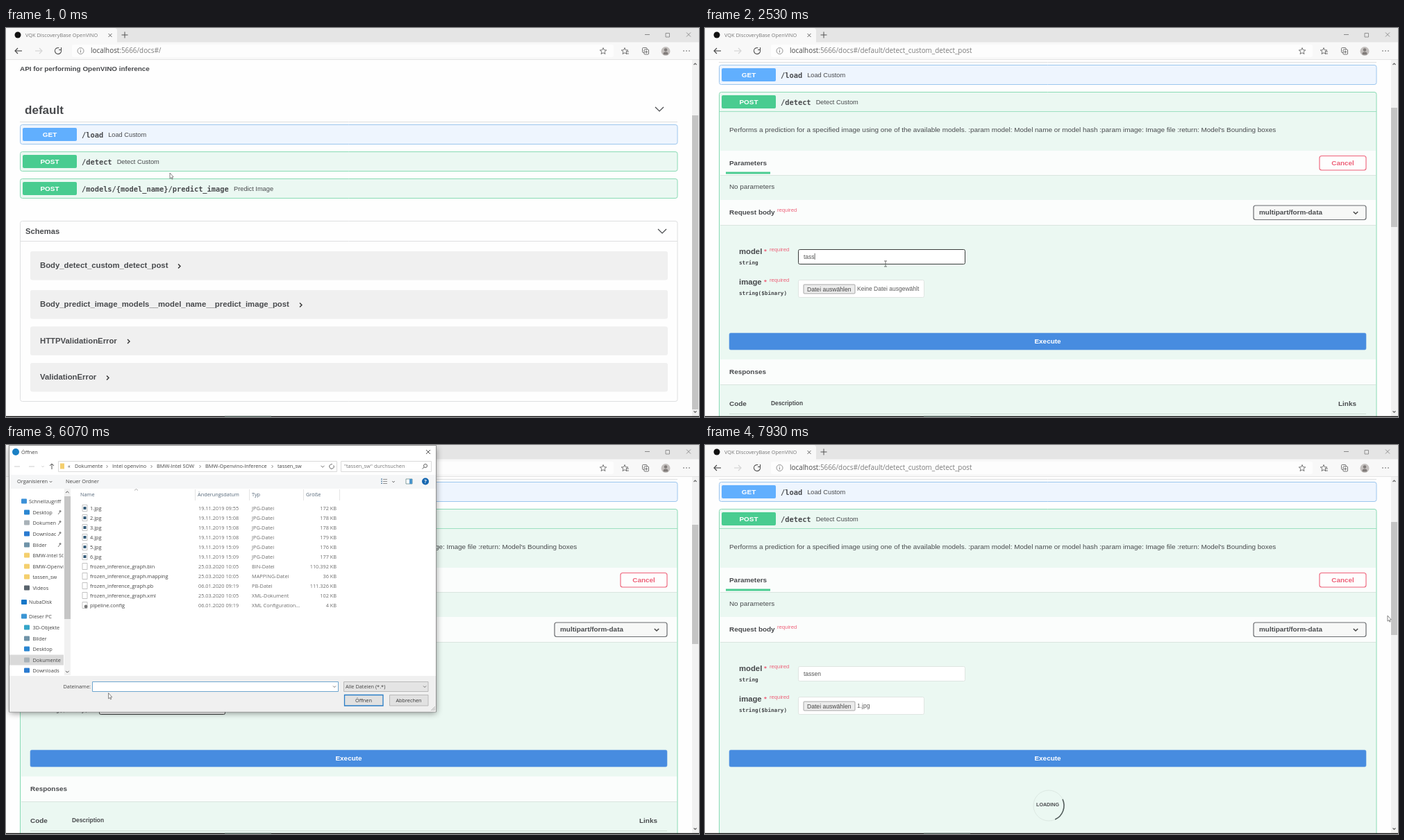
Animation of 998x561 px, one loop 8 s. Source, as an HTML page with a canvas:

```html
<!DOCTYPE html>
<html lang="en">
<head>
<meta charset="utf-8">
<title>API docs</title>
<style>
html, body { margin: 0; width: 998px; height: 561px; overflow: hidden; background: #fff; }
canvas { display: block; }
</style>
</head>
<body>
<canvas id="stage" width="998" height="561"></canvas>
<script>
const c = document.getElementById('stage').getContext('2d');
const ARIAL = '"Liberation Sans", Arial, sans-serif';
const UI = '"Open Sans", "Noto Sans", sans-serif';
const MONO = '"DejaVu Sans Mono", monospace';
const INK = '#484a4d', GREEN = '#49cc90', BLUE = '#61affe', RED = '#ee6078';
const GREEN_EDGE = '#8adbb5', BLUE_EDGE = '#9cc6ee';
const LOOP = 8000;

// Moments of the story, in ms
const T = { expand: 350, scroll: 600, tryIt: 1200, focus: 1800, upload: 4200, idle: 4870,
  open: 5400, list: 5620, pick: 6400, close: 6680, execute: 7250 };
const KEYS = [[2130, 't'], [2270, 'a'], [2400, 's'], [2480, 's'], [2600, 'e'], [2730, 'n']];
const PATH = [[70, 236, 213], [330, 218, 196], [600, 218, 196], [870, 300, 197], [930, 320, 197],
  [1150, 891, 200], [1330, 891, 200], [1730, 260, 340], [3000, 260, 340], [3470, 149, 388],
  [6000, 149, 388], [6380, 133, 101], [6490, 133, 101], [6660, 515, 370], [6870, 515, 370],
  [7150, 495, 455], [7350, 495, 455], [7830, 983, 250]];

const clamp = v => Math.max(0, Math.min(1, v));
const span = (t, from, length) => clamp((t - from) / length);
const smooth = p => p * p * (3 - 2 * p);
const easeOut = p => 1 - (1 - p) ** 3;

// Text is placed by its vertical centre
function text(s, x, y, size, color = INK, font = ARIAL, bold = false, align = 'left') {
  c.font = `${bold ? 'bold ' : ''}${size}px ${font}`;
  c.textAlign = align;
  c.fillStyle = color;
  c.fillText(s, x, y + size * 0.35);
}
const bold = (s, x, y, size = 9.94, color = INK, align = 'left') => text(s, x, y, size, color, ARIAL, true, align);
const ui = (s, x, y, color = '#444', align = 'left') => text(s, x, y, 7.35, color, UI, false, align);

function box(x, y, w, h, fill, stroke, r = 0, lw = 1) {
  c.beginPath();
  c.roundRect(x, y, w, h, r);
  if (fill) { c.fillStyle = fill; c.fill(); }
  if (stroke) { c.strokeStyle = stroke; c.lineWidth = lw; c.stroke(); }
}
function line(color, lw, ...p) {
  c.beginPath();
  for (let i = 0; i < p.length; i += 2) c.lineTo(p[i], p[i + 1]);
  c.strokeStyle = color;
  c.lineWidth = lw;
  c.stroke();
}
function arc(x, y, r, color, lw = 1, from = 0, to = 7) {
  c.beginPath();
  c.arc(x, y, r, from, Math.min(to, from + Math.PI * 2));
  c.strokeStyle = color;
  c.lineWidth = lw;
  c.stroke();
}
function dot(x, y, r, color) {
  c.beginPath();
  c.arc(x, y, r, 0, 7);
  c.fillStyle = color;
  c.fill();
}
function clipped(x, y, w, h, draw) {
  c.save();
  c.beginPath();
  c.rect(x, y, w, h);
  c.clip();
  draw();
  c.restore();
}
const down = (x, y, s, color, lw = 1.2) => line(color, lw, x - s, y - s / 2, x, y + s / 2, x + s, y - s / 2);
const right = (x, y, s, color, lw = 1.2) => line(color, lw, x - s / 2, y - s, x + s / 2, y, x - s / 2, y + s);
function cross(x, y, s, color) {
  line(color, 0.9, x - s, y - s, x + s, y + s);
  line(color, 0.9, x - s, y + s, x + s, y - s);
}

function operation(y, verb, path, label, color, edge, tint, h = 28) {
  box(20.5, y - 14, 946.5, h, tint, edge, 3);
  box(24, y - 9.5, 78, 19, color, null, 2);
  bold(verb, 63, y, 9.94, '#fff', 'center');
  text(path, 109, y + 0.5, 10.35, INK, MONO, true);
  text(label, 110 + path.length * 6.235 + 6, y, 9.25);
}
function band(y, h, label) {
  box(22, y, 944, h, 'rgba(255,255,255,.8)');
  box(22, y + h, 944, 1, 'rgba(0,0,0,.08)');
  bold(label, 35, y + h / 2);
}
function required(x, y) { text('required', x, y, 7.7, RED); }

function collapsed() {
  operation(145.5, 'POST', '/models/{model_name}/predict_image', 'Predict Image', GREEN, GREEN_EDGE, '#ebf8f2');
  box(20.5, 192.5, 946.5, 260, '#fefefe', '#dedfe0', 3);
  line('#dedfe0', 1, 20, 221.5, 967, 221.5);
  bold('Schemas', 28, 207, 11.2);
  down(945, 207, 6, INK);
  [['Body_detect_custom_detect_post', 236, 249], ['Body_predict_image_models__model_name__predict_image_post', 292, 424],
   ['HTTPValidationError', 344.5, 176], ['ValidationError', 397, 146]].forEach(([name, y, x]) => {
    box(35, y, 918, 41.5, '#f0f0f0', null, 3);
    bold(name, 49, y + 20.5, 11.33);
    right(x + 0.5, y + 21.5, 3, '#333', 1.4);
  });
}

function fields(t) {
  const modelFocus = t >= T.focus && t < T.upload;
  const typed = KEYS.filter(k => k[0] <= t).map(k => k[1]).join('');
  box(134.5, 319.5, 240, 21, '#fff', modelFocus ? '#3a3d3c' : '#dfe5e2', 2);
  text(typed || 'model', 142, 330, 8.52, typed ? '#555' : '#8b8b8b');
  if (modelFocus) {
    c.font = '8.52px ' + ARIAL;
    const x = 142.5 + c.measureText(typed).width;
    line('#444', 0.8, x, 325, x, 334);
  }
  const fileFocus = t >= T.upload && t < T.execute;
  box(134.5, 363.5, 181, 25, '#fff', fileFocus ? '#3a3d3c' : '#dfe5e2', 2);
  box(142, 370, 74, 13, '#ececec', '#a0a0a0', 1, 0.9);
  text('Datei auswählen', 147, 376.5, 8.6, '#444');
  text(t < T.close ? 'Keine Datei ausgewählt' : '1.jpg', 219, 376.5, 8.5, '#5c5c5c');
  box(35, 440, 917, 24, '#478ce0', '#5c98df', 2, 0.6);
  bold('Execute', 493.5, 452, 9.94, '#fff', 'center');
}

function responses(y) {
  band(y, 36, 'Responses');
  bold('Code', 35, y + 63.5);
  bold('Description', 95, y + 63.5, 8.4);
  bold('Links', 912, y + 63.5);
  line('#d0ddd6', 1, 35, y + 78.5, 952, y + 78.5);
}

function expanded(t) {
  const trying = t >= T.tryIt;
  line(GREEN_EDGE, 0.8, 21, 120.5, 967, 120.5);
  text("Performs a prediction for a specified image using one of the available models. :param model: Model name or model hash :param image: Image file :return: Model's Bounding boxes", 35, 147, 9.94);
  band(177, 35, 'Parameters');
  box(30, 207.5, 64, 3, GREEN);
  const p = span(t, 1290, 260), mix = (a, b) => Math.round(a + (b - a) * p);
  const tone = `rgb(${mix(110, 238)},${mix(105, 96)},${mix(110, 120)})`;
  box(885, 184.5, 67, 20.5, 'rgba(255,255,255,.7)', tone, 3, 1.1);
  bold(trying ? 'Cancel' : 'Try it out', 918.5, 194.5, 9.94, tone, 'center');
  text('No parameters', 35, 228.5, 9.86);
  band(248, 36, 'Request body');
  required(104, 262.5);
  box(790, 256, 162, 20.5, '#f7f8f7', '#6a6d70', 3, 1.2);
  bold('multipart/form-data', 798, 266);
  down(937, 266.5, 3.2, '#444', 1.4);
  [['model', 'string', 322], ['image', 'string($binary)', 366]].forEach(([name, type, y]) => {
    bold(name, 49, y, 11.3);
    bold('*', 85, y, 9.94, RED);
    required(93, y - 2.5);
    text(type, 49, y + 16, 7.65, INK, MONO, true);
  });
  if (trying) fields(t);
  if (t >= T.execute) {
    const a = 0.35 + (t - 7930) / 1000 * Math.PI * 2;
    arc(495, 520, 22, '#dce8e2', 1);
    arc(495, 520, 22, '#4f5a58', 1.5, a - Math.PI / 4, a + Math.PI / 4);
    bold('LOADING', 493.5, 518, 7.15, INK, 'center');
  } else responses(trying ? 478 : 428);
}

function page(t) {
  const isOpen = t >= T.expand;
  const shift = 86 * (1 - smooth(span(t, T.scroll, 200)));
  clipped(0, 46, 988, 515, () => {
    c.translate(0, shift);
    bold('API for performing OpenVINO inference', 20, -27);
    bold('default', 27, 32, 17.04);
    down(941, 31, 6, INK);
    line('#dedfe0', 1, 20, 49.5, 967, 49.5);
    operation(67.5, 'GET', '/load', 'Load Custom', BLUE, BLUE_EDGE, '#eef5fe');
    operation(106.5, 'POST', '/detect', 'Detect Custom', GREEN, GREEN_EDGE, '#ebf8f2', isOpen ? 700 : 28);
    isOpen ? expanded(t) : collapsed();
  });
  box(988, 46, 10, 515, '#f1f1f1');
  const [top, height] = !isOpen ? [126, 424] : t >= T.execute ? [111, 163] : [115 - shift / 3, 172];
  box(988, top, 9, height, '#c4c4c4');
  down(992.5, 553.5, 2, '#666');
  line('#666', 1.2, 990.5, 53, 992.5, 51, 994.5, 53);
  box(0, 559.7, 998, 1.3, '#111');
  box(315, 559.7, 67, 1.3, '#4a5a54');
}

function browser(t) {
  box(0, 0, 998, 21, '#e5e5e5');
  box(0, 20.5, 998, 25.5, '#f8f8f8');
  box(0, 0, 160, 22, '#f8f8f8', null, [0, 4, 0, 0]);
  box(95, 24, 780, 18, '#fdfdfd', null, 3);
  line('#e4e4e4', 1, 0, 45.5, 998, 45.5);
  dot(17, 10, 4.5, '#111');
  clipped(28, 0, 110, 20, () => ui('VQK DiscoveryBase OpenVINO', 28, 10.5, '#777'));
  cross(150, 10.5, 2.5, '#555');
  line('#555', 1, 166.5, 10, 175.5, 10);
  line('#555', 1, 171, 5.5, 171, 14.5);
  line('#888', 1, 920, 9.5, 927, 9.5);
  box(950, 7.5, 5.5, 5.5, null, '#888', 0, 0.9);
  cross(983, 9.5, 3, '#888');
  [[18, '#444', 1], [47, '#d4d4d4', -1]].forEach(([x, color, d]) => {
    line(color, 1.1, x - 5 * d, 33, x + 5 * d, 33);
    line(color, 1.1, x - d, 29, x - 5 * d, 33, x - d, 37);
  });
  arc(75, 33, 4.5, '#444', 1.1, -0.5, 5);
  line('#444', 1, 79.5, 28, 79.5, 31.5, 76, 31.5);
  arc(107.5, 33, 4.5, '#888', 0.9);
  line('#888', 1, 107.5, 32, 107.5, 35.5);
  dot(107.5, 30.5, 0.6, '#888');
  const rest = t < T.expand ? '/docs#/' : '/docs#/default/detect_custom_detect_post';
  text('localhost', 122, 33, 9.87, '#4a4a4a', UI);
  text(':5666' + rest, 122 + c.measureText('localhost').width, 33, 9.87, '#7c7c7c', UI);
  [860, 891].forEach(x => {
    const pts = [];
    for (let i = 0; i <= 10; i++) {
      const r = i % 2 ? 2.2 : 5, a = i * Math.PI / 5 - Math.PI / 2;
      pts.push(x + r * Math.cos(a), 33.5 + r * Math.sin(a));
    }
    line('#666', 0.9, ...pts);
  });
  line('#666', 0.9, 893, 34, 897, 34);
  line('#666', 0.9, 893, 37, 897, 37);
  box(916.5, 28.5, 6.5, 7, null, '#666', 1, 0.9);
  box(919, 31, 6.5, 7, '#f8f8f8', '#666', 1, 0.9);
  line('#666', 0.9, 922.2, 32.5, 922.2, 36.5);
  line('#666', 0.9, 920.2, 34.5, 924.2, 34.5);
  dot(950, 33.5, 6.5, '#c4c0be');
  dot(950, 31.5, 2.3, '#807b79');
  box(946.5, 34.5, 7, 4, '#807b79', null, [3, 3, 1, 1]);
  [976, 980, 984].forEach(x => dot(x, 33, 0.8, '#555'));
}

const SIDE = [[81, 'Schnellzugriff', 0, '#3c91d8'], [97, 'Desktop', 1, '#2a86d1', 1], [112, 'Dokumente', 1, '#a9b2b8', 1],
  [128, 'Downloads', 1, '#2a7bd0', 1], [144, 'Bilder', 1, '#6f93a8', 1], [159, 'BMW-Intel SOW', 1, '#f4cf6e'],
  [175, 'BMW-Openvino-Inference', 1, '#f4cf6e'], [190, 'tassen_sw', 1, '#f4cf6e'], [206, 'Videos', 1, '#59636c'],
  [226.5, 'NubaDisk', 0, '#1677c8'], [247, 'Dieser PC', 0, '#3a95d4'], [263, '3D-Objekte', 1, '#35a5c8'],
  [279, 'Bilder', 1, '#6f93a8'], [294, 'Desktop', 1, '#2a86d1'], [310, 'Dokumente', 1, '#a9b2b8'], [325, 'Downloads', 1, '#2a7bd0']];
const GRAPH = 'frozen_inference_graph.';
const FILES = [
  ...[172, 178, 178, 179, 176, 177].map((kb, i) =>
    [`${i + 1}.jpg`, '19.11.2019 ' + (i ? i < 4 ? '15:08' : '15:09' : '09:55'), 'JPG-Datei', kb]),
  [GRAPH + 'bin', '25.03.2020 10:05', 'BIN-Datei', '110.392'], [GRAPH + 'mapping', '25.03.2020 10:05', 'MAPPING-Datei', 36],
  [GRAPH + 'pb', '06.01.2020 09:19', 'PB-Datei', '111.326'], [GRAPH + 'xml', '25.03.2020 10:05', 'XML-Dokument', 102],
  ['pipeline.config', '06.01.2020 09:19', 'XML Configuration...', 4]];

function dialogBody(t) {
  const picked = t >= T.pick;
  line('#ccc', 1, 12, 31, 20, 31);
  line('#ccc', 1, 33, 31, 41, 31);
  down(53, 31, 1.5, '#bbb', 0.8);
  line('#555', 1, 66, 35, 66, 27);
  line('#555', 1, 63, 30, 66, 27, 69, 30);
  box(75.5, 23.5, 401, 15, '#fff', '#dadada');
  box(78, 26.5, 6, 8, '#f4cf6e');
  ui('«', 89, 30.5);
  [['Dokumente', 99], ['Intel openvino', 153], ['BMW-Intel SOW', 217], ['BMW-Openvino-Inference', 287], ['tassen_sw', 391]]
    .forEach(([s, x], i) => { ui(s, x, 30.5); if (i) right(x - 7.5, 31, 2, '#666', 0.8); });
  down(456, 31, 2.5, '#666', 0.9);
  arc(469, 31, 3.3, '#555', 0.9, -0.5, 5);
  box(482.5, 23.5, 130, 15, '#fff', '#dadada');
  ui('"tassen_sw" durchsuchen', 487, 30.5, '#777');
  arc(604, 30, 2.5, '#555', 0.9);
  line('#555', 0.9, 602, 32, 599.5, 34.5);
  box(5, 43, 614, 20, '#f5f6f7');
  ui('Organisieren', 16, 52.5);
  down(64.5, 53, 1.7, '#555', 1);
  ui('Neuer Ordner', 86, 52.5);
  [49.5, 52.5, 55.5].forEach(y => { box(540, y - 1, 2, 1.6, '#6a8fae'); line('#777', 0.8, 543, y, 549, y); });
  down(558, 53, 1.7, '#555', 1);
  box(576, 49, 9, 7, '#fff', '#688', 0, 0.8);
  box(581, 49, 4, 7, '#4a95cc');
  dot(604, 52.5, 5, '#1667b0');
  text('?', 604, 52.5, 7.5, '#fff', UI, true, 'center');

  box(5, 302.5, 78, 15, '#d9d9d9');
  SIDE.forEach(([y, s, indent, color, pin]) => {
    box(indent ? 26 : 22, y - 3.5, 8, 7, color, null, 1);
    clipped(0, y - 8, pin ? 72 : 82.5, 16, () => ui(s, indent ? 38.5 : 33, y));
    if (pin) { line('#777', 1, 75, y + 3, 79, y - 2); dot(78, y - 1.5, 1.5, '#888'); }
  });
  box(84, 63, 9, 269, '#f1f1f1');
  box(84, 74, 9, 177, '#c5c5c5');
  line('#555', 1, 86, 69, 88.3, 67, 90.6, 69);
  down(88.3, 327, 2.3, '#555', 1);

  [['Name', 107], ['Änderungsdatum', 276], ['Typ', 354], ['Größe', 432]].forEach(([s, x]) => ui(s, x, 71.5, '#56687a'));
  [272.5, 350.5, 428.5, 480.5].forEach(x => line('#e5e5e5', 1, x, 64, x, 80));
  line('#888', 0.7, 185, 65.5, 187.5, 63.5, 190, 65.5);
  if (picked) box(106.5, 84.5, 371, 13.5, '#cce8ff', '#99d1ff');
  FILES.forEach(([name, date, type, kb], i) => {
    const y = 91 + 14 * i;
    box(110, y - 4.5, 7, 9, '#fff', '#b5b5b5', 0, 0.8);
    if (i < 6) box(111.5, y - 2, 4, 4, '#345a78');
    if (i === 10) dot(115, y + 2, 2.4, '#777');
    ui(name, 121, y);
    ui(date, 277, y, '#6d6d6d');
    ui(type, 354, y, '#6d6d6d');
    ui(kb + ' KB', 476, y, '#6d6d6d', 'right');
  });

  ui('Dateiname:', 122, 348.5, '#444', 'right');
  box(124.5, 341.5, 354, 14, '#fff', '#6fa6cf');
  if (picked) ui('1.jpg', 127, 348.5);
  down(473, 348.5, 2, '#666', 0.9);
  box(486.5, 341.5, 121.5, 14, '#e4e4e4', '#b9b9b9');
  ui('Alle Dateien (*.*)', 489, 348.5);
  down(603, 348.5, 2, '#666', 0.9);
  box(487.5, 360.5, 55.5, 15.5, '#e1e1e1', '#2a7ec6', 0, 1.3);
  ui('Öffnen', 515, 368, '#333', 'center');
  box(552.5, 360.5, 55.5, 15.5, '#e1e1e1', '#b9b9b9');
  ui('Abbrechen', 580, 368, '#333', 'center');
  for (let i = 0; i < 3; i++) line('#aaa', 0.8, 612 + i * 2, 383, 618, 377 + i * 2);
}

function dialog(t) {
  const shown = easeOut(span(t, T.open, 230)) * (1 - span(t, T.close, 120));
  if (!shown) return;
  const scale = 0.9 + 0.1 * shown;
  c.save();
  c.translate(312, 192.5);
  c.scale(scale, scale);
  c.translate(-312, -192.5);
  c.globalAlpha = shown;
  c.shadowColor = 'rgba(0,0,0,.45)';
  c.shadowBlur = 9;
  c.shadowOffsetY = 2;
  box(4.5, 0.5, 615, 384.5, '#fff');
  c.shadowColor = 'transparent';
  box(4.5, 0.5, 615, 384.5, null, '#8a8a8a', 0, 0.9);
  box(5, 333, 614, 51.5, '#f0f0f0');
  dot(14, 10, 5, '#1a80c4');
  ui('Öffnen', 22, 10.5);
  cross(608, 10, 3, '#444');
  if (t >= T.list) dialogBody(t);
  else [[82, 342, 40, 12], [124, 341, 355, 15], [486, 341, 122, 15], [485, 360, 58, 16], [552, 360, 56, 16]]
    .forEach(b => box(...b, '#fff'));
  c.restore();
}

function shape(...p) {
  c.beginPath();
  for (let i = 0; i < p.length; i += 2) c.lineTo(p[i], p[i + 1]);
  c.closePath();
  c.fillStyle = '#fff';
  c.strokeStyle = '#666';
  c.lineWidth = 0.8;
  c.fill();
  c.stroke();
}

function pointer(t) {
  const i = PATH.findIndex(k => k[0] > t);
  const b = PATH.at(i), a = i > 0 ? PATH[i - 1] : b;
  const p = a === b ? 0 : smooth(span(t, a[0], b[0] - a[0]));
  const x = a[1] + (b[1] - a[1]) * p, y = a[2] + (b[2] - a[2]) * p;
  const inField = t > 1500 && t < 3200 && x > 134 && x < 374 && y > 319 && y < 341;
  const onButton = t > T.scroll && t < 1500 && x > 884 || t > 7000 && t < 7500 && y > 440;
  c.save();
  c.translate(x, y);
  if (inField) {
    line('#666', 0.9, 0, -4, 0, 4);
    line('#666', 0.9, -2, -4, 2, -4);
    line('#666', 0.9, -2, 4, 2, 4);
  } else if (onButton) {
    shape(-1, -5, 0.6, -5, 0.9, -1, 4, 0, 4.5, 2, 3.6, 6, -1, 6, -3.6, 2, -3, 1, -1, 2.5);
  } else {
    shape(0, -4, 0, 4.2, 1.8, 2.6, 3, 5.2, 4.1, 4.7, 3, 2.1, 5.2, 1.9);
    if (t >= T.upload && t < T.idle) {
      const spin = t / 160;
      arc(6, -3, 3, '#3d7fd6', 1.8);
      arc(6, -3, 3, '#8fc0f5', 1.8, spin, spin + 1.3);
    }
  }
  c.restore();
}

function frame(now) {
  const t = now % LOOP;
  box(0, 0, 998, 561, '#fefefe');
  page(t);
  browser(t);
  dialog(t);
  pointer(t);
  requestAnimationFrame(frame);
}
requestAnimationFrame(frame);
</script>
</body>
</html>
```
